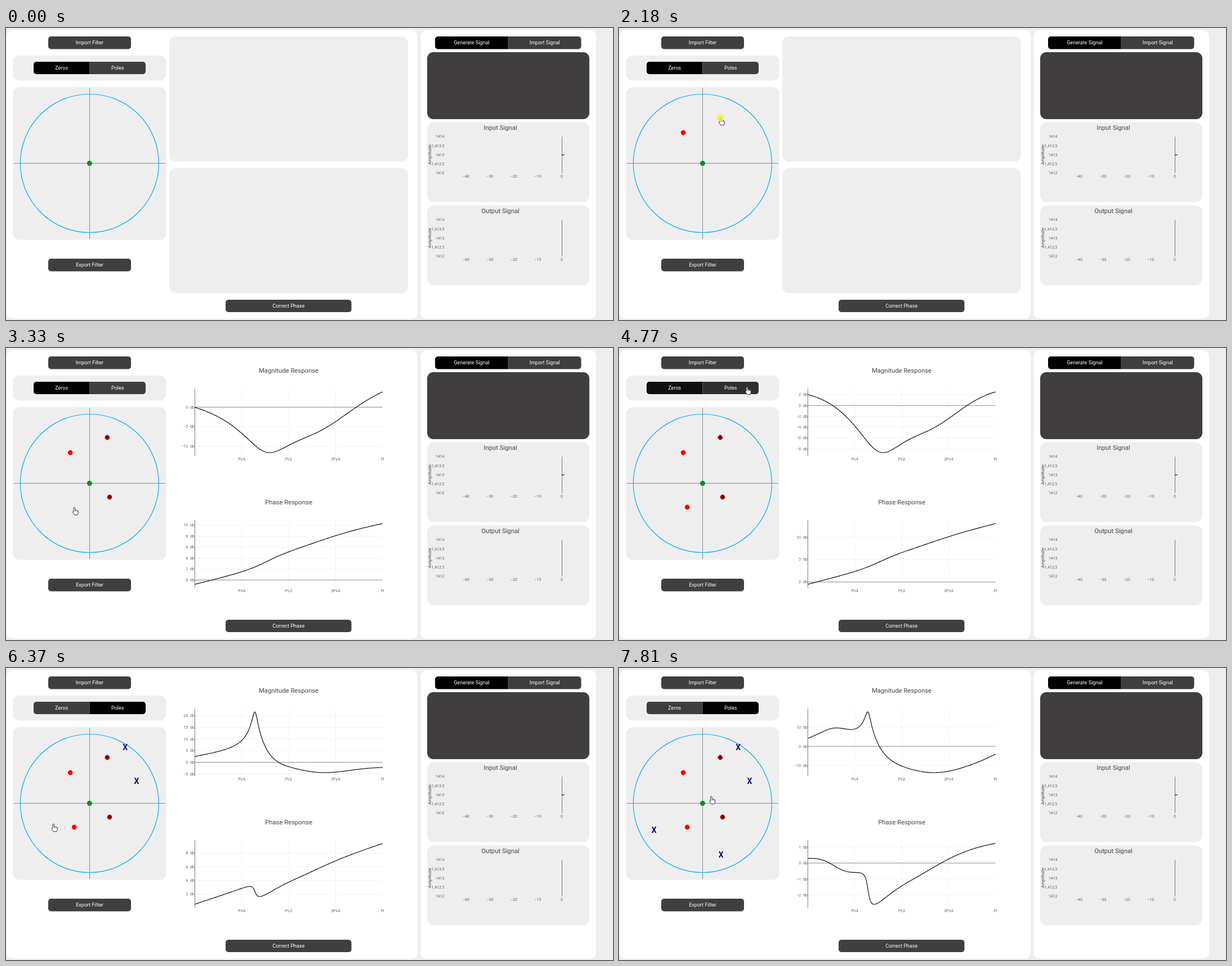
An HTML page with a canvas that plays this animation: 1078 by 519 pixels, repeating every 8000 ms.

```html
<!DOCTYPE html>
<html lang="en">
<head>
<meta charset="utf-8">
<title>Filter designer</title>
<style>
html, body { margin: 0; width: 100%; height: 100%; overflow: hidden; background: #eee; }
canvas { display: block; width: 1078px; height: 519px; }
</style>
</head>
<body>
<canvas id="stage"></canvas>
<script>
const W = 1078, H = 519, LOOP = 8000;
const canvas = document.getElementById('stage');
const ctx = canvas.getContext('2d');
const dpr = window.devicePixelRatio || 1;
canvas.width = W * dpr;
canvas.height = H * dpr;

const GREY = '#eeeeee', DARK = 62;
const SANS = 'Roboto, sans-serif', TICK = '"Open Sans", sans-serif';
const CX = 148.4, CY = 240.5, R = 123;

// Each placed root: position, highlight on, highlight off, visible from, plotted from
const roots = [
  { x: 114.2, y: 186, on: 1430, off: 1680, show: 1680, plot: 2310 },
  { x: 179.8, y: 159, on: 2120, off: 2380, show: 2380, plot: 2540, hot: true },
  { x: 184, y: 265, on: 2980, off: 3190, show: 3190, plot: 3260, hot: true },
  { x: 121.2, y: 283, on: 3510, off: 3700, show: 3700, plot: 3870 },
  { x: 211.7, y: 140.5, on: 5220, off: 5510, show: 5510, plot: 5710, pole: true },
  { x: 232, y: 201, on: 5960, off: 6160, show: 6160, plot: 6440, pole: true },
  { x: 62.3, y: 288, on: 6620, off: 6830, show: 6830, plot: 7030, pole: true },
  { x: 181.3, y: 332, on: 7360, off: 7550, show: 7550, plot: 7750, pole: true }
];
const tabClick = { x: 227, y: 69, on: 4430, off: 4710 };

// Pointer: time, position, shape (a arrow, h hand, m move)
const pointer = [
  [450, 796, 459, 'a'], [520, 640, 372, 'a'], [600, 449, 293, 'a'],
  [810, 330, 246, 'a'], [880, 216, 207, 'h'], [950, 120, 176, 'h'], [1020, 58, 158, 'h'],
  [1090, 41, 153, 'h'], [1150, 86, 170, 'h'], [1220, 114, 186, 'h'], [1590, 114, 186, 'm'],
  [1820, 134, 174, 'h'], [1900, 170, 154, 'h'], [1980, 180, 159, 'h'], [2310, 180, 159, 'm'],
  [2610, 182, 190, 'h'], [2690, 184, 238, 'h'], [2770, 184, 265, 'h'], [3120, 184, 265, 'm'],
  [3260, 152, 277, 'h'], [3330, 121, 283, 'h'], [3640, 121, 283, 'm'],
  [3870, 146, 222, 'h'], [3940, 190, 130, 'h'], [4000, 218, 82, 'a'], [4060, 227, 69, 'a'],
  [4230, 227, 69, 'h'], [4890, 224, 92, 'a'], [4960, 215, 124, 'h'], [5030, 211, 141, 'h'],
  [5430, 211, 141, 'm'], [5710, 222, 172, 'h'], [5760, 232, 201, 'h'], [6160, 232, 201, 'm'],
  [6300, 160, 240, 'h'], [6370, 84, 277, 'h'], [6440, 62, 288, 'h'], [6830, 62, 288, 'm'],
  [6960, 96, 302, 'h'], [7030, 148, 322, 'h'], [7100, 181, 332, 'h'], [7450, 181, 332, 'm'],
  [7690, 172, 304, 'h'], [7750, 162, 258, 'h'], [7810, 163.5, 228, 'h']
];

const hand = new Path2D('M-.9 8V1.2Q-.9 .2 .3 .2T1.5 1.2V5Q2.6 4.4 3.6 5.4Q4.8 4.9 5.5 5.9Q7.2 5.6 7.2 7.2V10Q7 12 6 13.8H.6Q-.6 11.6-2.5 9.2Q-3 7.8-1.8 7.3Z');
const knuckles = new Path2D('M1.5 5V8M3.6 5.4V8M5.5 5.9V8');
const arrow = new Path2D('M0 0V9.4L2.2 7.4L3.7 10.8L5.1 10.2L3.6 6.9H6.6Z');

const grey = v => `rgb(${v},${v},${v})`;

function box(x, y, x2, y2, r, fill) {
  ctx.fillStyle = fill;
  ctx.beginPath();
  ctx.roundRect(x, y, x2 - x, y2 - y, r);
  ctx.fill();
}

function line(x, y, x2, y2, color, width = 1) {
  ctx.strokeStyle = color;
  ctx.lineWidth = width;
  ctx.beginPath();
  ctx.moveTo(x, y);
  ctx.lineTo(x2, y2);
  ctx.stroke();
}

function disc(x, y, r, fill) {
  ctx.fillStyle = fill;
  ctx.beginPath();
  ctx.arc(x, y, r, 0, 2 * Math.PI);
  ctx.fill();
}

// Text whose capitals are centred on y
function text(s, x, y, size, color, family = SANS, align = 'center', weight = 400) {
  ctx.font = `${weight} ${size}px ${family}`;
  ctx.fillStyle = color;
  ctx.textAlign = align;
  ctx.fillText(s, x, y + size * 0.355);
}

const title = (s, x, y) => text(s, x, y, 11.3, '#444');
const tick = (s, x, y, align) => text(s, x, y, 6.8, '#505050', TICK, align);
const num = v => String(v).replace('-', '\u2212');

function button(s, x, y, x2, y2) {
  box(x, y, x2, y2, 5, '#403e3f');
  text(s, (x + x2) / 2, (y + y2) / 2, 9.05, '#fff');
}

// p = 0: left tab selected, p = 1: right tab selected
function tabs(left, right, x, y, x2, y2, p) {
  const mid = (x + x2) / 2;
  box(x, y, mid, y2, [5, 0, 0, 5], grey(DARK * p));
  box(mid, y, x2, y2, [0, 5, 5, 0], grey(DARK * (1 - p)));
  text(left, (x + mid) / 2, (y + y2) / 2, 9.05, '#fff');
  text(right, (mid + x2) / 2, (y + y2) / 2, 9.05, '#fff');
}

function signalChart(name, y, dash) {
  box(748, y, 1036, y + 142, 12, GREY);
  title(name, 878, y + 9.5);
  ['1414', '1,413.5', '1413', '1,412.5', '1412'].forEach((s, i) => tick(s, 778.5, y + 25.5 + i * 16.25, 'right'));
  for (let i = 0; i < 5; i++) tick(num(i * 10 - 40), 817 + i * 42.5, y + 96);
  ctx.save();
  ctx.translate(752, y + 57.5);
  ctx.rotate(-Math.PI / 2);
  text('Amplitude', 0, 0, 7.9, '#444');
  ctx.restore();
  line(987.5, y + 25.5, 987.5, y + 90.5, '#777');
  if (dash) line(987, y + 58, 991.5, y + 58, '#111', 1.3);
}

// Magnitude in dB and unwrapped phase on the upper unit circle
function response(list) {
  const mag = [], phase = [], n = 240;
  for (let i = 0; i <= n; i++) {
    const w = Math.PI * i / n;
    let db = 0, arg = 0;
    for (const q of list) {
      const re = Math.cos(w) - (q.x - CX) / R, im = Math.sin(w) - (CY - q.y) / R;
      const sign = q.pole ? -1 : 1;
      db += sign * 20 * Math.log10(Math.hypot(re, im));
      arg += sign * Math.atan2(im, re);
    }
    if (i) arg += 2 * Math.PI * Math.round((phase[i - 1] - arg) / (2 * Math.PI));
    mag.push(db);
    phase.push(arg);
  }
  return [mag, phase];
}

function tickStep(range) {
  const rough = range / 6.6, base = 10 ** Math.floor(Math.log10(rough));
  return base * [1, 2, 5, 10].find(m => m >= rough / base - 1e-9);
}

function plot(name, data, top) {
  const x0 = 335.3, x1 = 668.7, len = 120, pad = 6;
  const lo = Math.min(...data), hi = Math.max(...data);
  const scale = (len - 2 * pad) / (hi - lo);
  const py = v => top + pad + (hi - v) * scale;
  const min = lo - pad / scale, max = hi + pad / scale, step = tickStep(max - min);
  ctx.fillStyle = '#fff';
  ctx.fillRect(290, top - 57, 424, 223);
  title(name, 502, top - 32);
  ['PI/4', 'PI/2', '3PI/4', 'PI'].forEach((s, i) => {
    const x = x0 + (x1 - x0) * (i + 1) / 4;
    if (i < 3) line(x, top, x, top + len, '#f3f3f3');
    tick(s, x, top + 125.5);
  });
  for (let k = Math.ceil(min / step); k * step <= max; k++) {
    const y = py(k * step);
    line(x0, y, x1, y, k ? '#f3f3f3' : '#888');
    tick(num(k * step) + '\u00a0\u00a0db', 335, y, 'right');
  }
  line(x0, top, x0, top + len, '#777');
  ctx.strokeStyle = '#0c0a24';
  ctx.lineWidth = 1.2;
  ctx.lineJoin = 'round';
  ctx.beginPath();
  data.forEach((v, i) => ctx.lineTo(x0 + (x1 - x0) * i / (data.length - 1), py(v)));
  ctx.stroke();
}

function drawRoot(q) {
  if (q.pole) return text('X', q.x, q.y + 0.3, 14, '#0b0b6e', SANS, 'center', 700);
  disc(q.x, q.y, 4.4, q.hot ? '#c21015' : '#f40606');
  if (q.hot) {
    line(q.x - 3.4, q.y, q.x + 3.4, q.y, '#1c0000', 1.2);
    line(q.x, q.y - 3.4, q.x, q.y + 3.4, '#1c0000', 1.2);
  }
}

function drawPointer([, x, y, kind]) {
  ctx.save();
  ctx.translate(x, y);
  ctx.fillStyle = '#fff';
  ctx.strokeStyle = '#1c1c28';
  ctx.lineWidth = 0.9;
  if (kind === 'm') {
    for (let i = 0; i < 4; i++) {
      ctx.rotate(Math.PI / 2);
      ctx.beginPath();
      [[0, -6.2], [2.2, -4], [0, -1.8], [-2.2, -4]].forEach(p => ctx.lineTo(...p));
      ctx.closePath();
      ctx.fill();
      ctx.stroke();
    }
  } else {
    const shape = kind === 'h' ? hand : arrow;
    ctx.fill(shape);
    ctx.stroke(shape);
    if (kind === 'h') {
      ctx.lineWidth = 0.5;
      ctx.stroke(knuckles);
    }
  }
  ctx.restore();
}

function tabShift(t) {
  const at = [4710, 4770, 4830, 4890, 4960].filter(s => t >= s).length;
  return [0, 0.06, 0.24, 0.55, 0.85, 1][at];
}

function draw(t) {
  ctx.setTransform(dpr, 0, 0, dpr, 0, 0);
  ctx.fillStyle = GREY;
  ctx.fillRect(0, 0, W, H);
  box(1, 4, 731, 516.5, 10, '#fff');
  box(736.5, 4, 1048, 516.5, 10, '#fff');

  button('Import Filter', 75, 15, 222, 37.5);
  box(12.5, 49, 284.5, 93.5, 12, GREY);
  tabs('Zeros', 'Poles', 49, 60, 248, 82, tabShift(t));
  box(12.5, 105, 284.5, 376.5, 12, GREY);
  button('Export Filter', 75, 410, 222, 432.5);
  button('Correct Phase', 390, 483, 613.5, 505);

  tabs('Generate Signal', 'Import Signal', 762, 15, 1021.5, 37.5, 0);
  box(748, 43, 1036, 162, 11, '#403e3f');
  signalChart('Input Signal', 167.5, true);
  signalChart('Output Signal', 315.5, false);

  line(14, CY, 283, CY, '#888');
  line(148.5, 106, 148.5, 375, '#888');
  ctx.strokeStyle = '#08aeee';
  ctx.lineWidth = 1.2;
  ctx.beginPath();
  ctx.arc(CX, CY, R, 0, 2 * Math.PI);
  ctx.stroke();
  disc(CX, CY, 4.5, '#158a1f');

  const plotted = roots.filter(q => t >= q.plot);
  if (plotted.length) {
    const [mag, phase] = response(plotted);
    plot('Magnitude Response', mag, 72);
    plot('Phase Response', phase, 306);
  } else {
    box(290, 15, 714, 237.5, 12, GREY);
    box(290, 249, 714, 471.5, 12, GREY);
  }

  const shown = roots.filter(q => t >= q.show);
  shown.forEach(drawRoot);

  const cursor = pointer.filter(p => t >= p[0]).pop();
  const last = shown[shown.length - 1];
  const merged = cursor && cursor[3] === 'm' && last && last.hot && t < last.plot;
  if (cursor && !merged) drawPointer(cursor);
  for (const q of [...roots, tabClick]) {
    if (t >= q.on && t < q.off) disc(q.x, q.y, 7, 'rgba(246,240,70,.72)');
  }
}

const start = performance.now();
function frame() {
  draw((performance.now() - start) % LOOP);
  requestAnimationFrame(frame);
}
frame();
</script>
</body>
</html>
```
